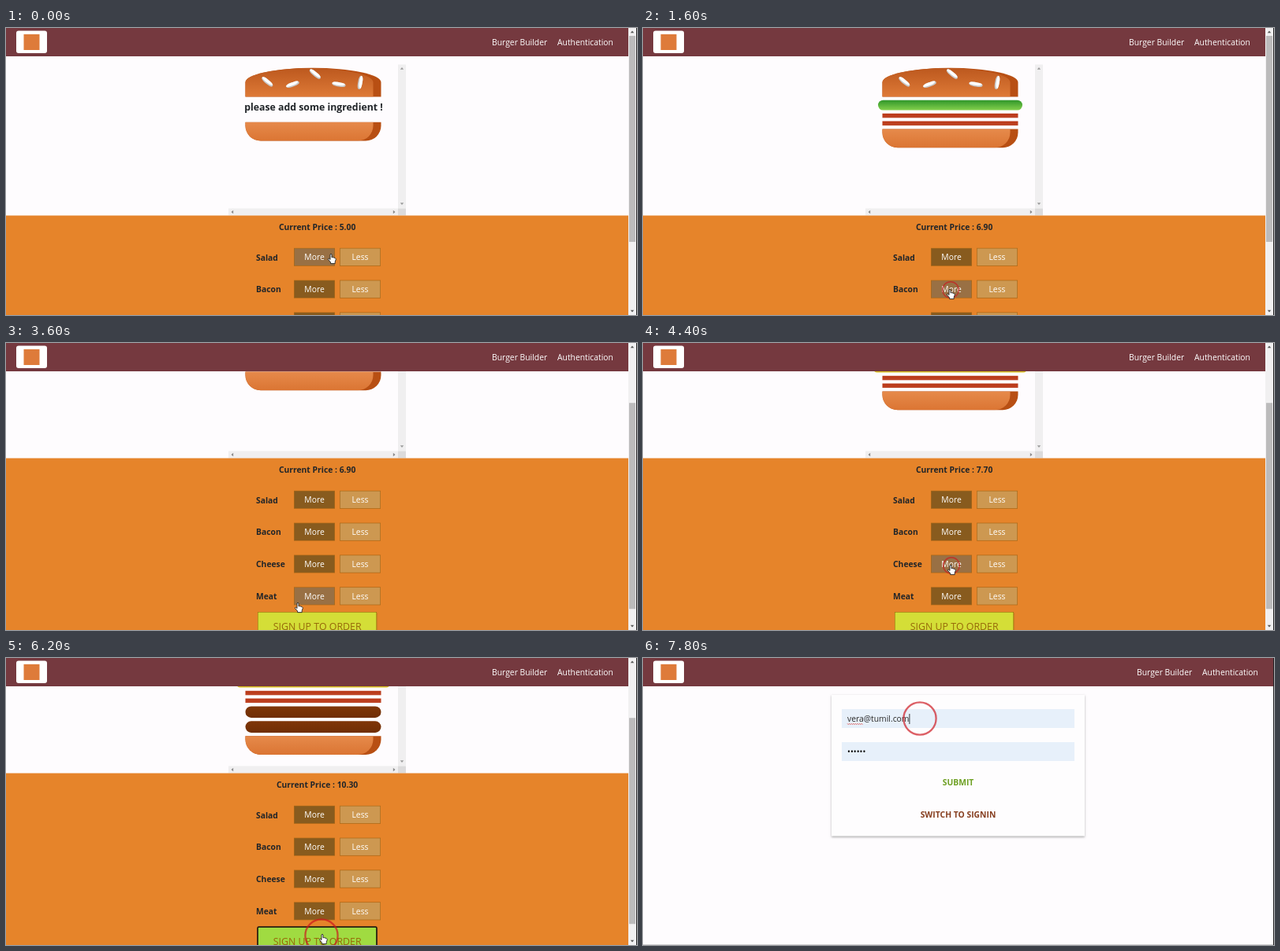
An HTML page with a canvas that plays this animation: 800x365 px, repeating every 8 s.

```html
<!DOCTYPE html>
<html lang="en">
<head>
<meta charset="utf-8">
<title>Burger Builder</title>
<style>
  html, body { margin: 0; width: 100%; height: 100%; overflow: hidden; background: #fefcfe; }
  canvas { display: block; width: 800px; height: 365px; }
</style>
</head>
<body>
<canvas id="stage"></canvas>
<script>
const W = 800, H = 365, LOOP = 8000, STEP = 200;
const canvas = document.getElementById('stage');
const ctx = canvas.getContext('2d');
const dpr = window.devicePixelRatio || 1;
canvas.width = W * dpr;
canvas.height = H * dpr;

const FONT = '"Open Sans", sans-serif';
const EMAIL = 'vera@tumil.com';
const PRICES = { salad: 0.5, cheese: 0.4, bacon: 0.7, meat: 1.3 };
const ROWS = ['Salad', 'Bacon', 'Cheese', 'Meat'];
const AUTH_AT = 6400;
const HIDE_POINTER_AT = 7400;

// time, x, y, added ingredient
const CLICKS = [
  [300, 401, 290, 'salad'],
  [1100, 390, 333, 'bacon'],
  [1500, 390, 333, 'bacon'],
  [2200, 798, 222],
  [3900, 391, 283, 'cheese'],
  [4300, 391, 283, 'cheese'],
  [5300, 391, 321, 'meat'],
  [5600, 391, 321, 'meat'],
  [6000, 400, 353],
  [7600, 351, 77]
];

// time, x, y of the pointer tip
const PATH = [
  [0, 412, 287], [200, 401, 288], [600, 399, 289], [1000, 389, 332],
  [1600, 389, 332], [1800, 570, 292], [2000, 795, 222], [2200, 795, 222],
  [2400, 795, 282], [2600, 795, 289], [2800, 795, 289], [3200, 580, 318],
  [3600, 370, 330], [3800, 390, 282], [4800, 390, 282], [5200, 390, 319],
  [5600, 390, 319], [6000, 401, 351], [6200, 401, 351], [6800, 440, 210],
  [7200, 454, 139], [8000, 454, 139]
];

function pointerAt(t) {
  const i = Math.max(1, PATH.findIndex(p => p[0] >= t));
  const [t0, x0, y0] = PATH[i - 1], [t1, x1, y1] = PATH[i];
  const k = (t - t0) / (t1 - t0);
  return { x: x0 + (x1 - x0) * k, y: y0 + (y1 - y0) * k };
}

const scrollAt = t => t < 2400 ? 0 : t < 2600 ? 82 : 92;

function countsAt(t) {
  const n = { salad: 0, cheese: 0, bacon: 0, meat: 0 };
  for (const [at, , , kind] of CLICKS) if (kind && at <= t) n[kind]++;
  return n;
}

function rect(x, y, w, h, color) {
  ctx.fillStyle = color;
  ctx.fillRect(x, y, w, h);
}

function text(str, x, y, size, color, weight = 400, align = 'left') {
  ctx.font = `${weight} ${size}px ${FONT}`;
  ctx.textAlign = align;
  ctx.fillStyle = color;
  ctx.fillText(str, x, y);
}

function vertical(y, h, from, to) {
  const g = ctx.createLinearGradient(0, y, 0, y + h);
  g.addColorStop(0, from);
  g.addColorStop(1, to);
  return g;
}

function rounded(x, y, w, h, radii) {
  const p = new Path2D();
  p.roundRect(x, y, w, h, radii);
  return p;
}

// Shape with a hard inner shade left by a shifted copy of itself
function shaded(path, light, dark, dx, dy) {
  ctx.save();
  ctx.fillStyle = dark;
  ctx.fill(path);
  ctx.clip(path);
  ctx.translate(dx, dy);
  ctx.fillStyle = light;
  ctx.fill(path);
  ctx.restore();
}

function seed(x, y, deg) {
  ctx.save();
  ctx.translate(x, y);
  ctx.rotate(deg * Math.PI / 180);
  shaded(rounded(-8.6, -2.75, 17.2, 5.5, [{ x: 6.9, y: 2.2 }]), '#fff', '#c9c9c9', -1.2, -1.6);
  ctx.restore();
}

const LAYERS = {
  salad: { w: 183, h: 12.8, r: 6.4, from: '#2f962a', to: '#84d04c' },
  cheese: { w: 193.5, h: 8.2, r: 4.1, from: '#f4d004', to: '#d6bb22' },
  bacon: { w: 172, h: 5.5, r: 0, from: '#b93514', to: '#c0482a' },
  meat: { w: 172, h: 14.6, r: 7.3, from: '#7f3608', to: '#702e05' }
};

function burger(top, counts) {
  const mid = 389.5, left = 303.5, gap = 4.3;
  let y = top + gap;
  const bun = rounded(left, y, 172, 36.6, [{ x: 86, y: 18.3 }, { x: 86, y: 18.3 }, 0, 0]);
  shaded(bun, vertical(y, 36.6, '#bc581e', '#de7a37'), '#b84f13', -10, 0);
  seed(363.5, y + 21, -20);
  seed(331.3, y + 17.6, 40);
  seed(391.9, y + 7.8, 40);
  seed(422, y + 21, 10);
  seed(449, y + 18.5, 100);
  y += 36.6 + gap;

  let empty = true;
  for (const kind in LAYERS) {
    const { w, h, r, from, to } = LAYERS[kind];
    for (let i = 0; i < counts[kind]; i++) {
      ctx.fillStyle = vertical(y, h, from, to);
      ctx.fill(rounded(mid - w / 2, y, w, h, r));
      y += h + gap;
      empty = false;
    }
  }
  if (empty) {
    text('please add some ingredient !', 390, top + 58.8, 12.3, '#212529', 700, 'center');
    y = top + 73.3;
  }
  const base = rounded(left, y, 172, 23.8, [0, 0, 19.4, 19.4]);
  shaded(base, vertical(y, 23.8, '#e68a4b', '#db7533'), '#b84f13', -10, 0);
}

function arrowhead(x, y, dx, dy, color) {
  ctx.fillStyle = color;
  ctx.beginPath();
  ctx.moveTo(x + dx * 1.5, y + dy * 1.5);
  ctx.lineTo(x - dx * 1.2 + dy * 2.2, y - dy * 1.2 + dx * 2.2);
  ctx.lineTo(x - dx * 1.2 - dy * 2.2, y - dy * 1.2 - dx * 2.2);
  ctx.fill();
}

function viewerBars(y) {
  rect(497, y, 10, 183, '#f0eff0');
  rect(282, y + 183, 215, 9, '#f0eff0');
  rect(497, y + 183, 10, 9, '#dcdbdc');
  arrowhead(502, y + 5, 0, -1, '#9b9b9b');
  arrowhead(502, y + 177, 0, 1, '#9b9b9b');
  arrowhead(287, y + 187.5, -1, 0, '#888');
  arrowhead(492, y + 187.5, 1, 0, '#888');
}

const inside = (p, x, y, w, h) => p.x >= x && p.x <= x + w && p.y >= y && p.y <= y + h;

function button(label, x, y, color) {
  rect(x, y, 52, 23, '#aa6817');
  rect(x + 0.7, y + 0.7, 50.6, 21.6, color);
  text(label, x + 26, y + 15.5, 10.35, '#fff', 400, 'center');
}

function orderButton(y, hover, focus) {
  ctx.save();
  ctx.shadowColor = '#966909';
  ctx.shadowOffsetX = ctx.shadowOffsetY = 1.3 * dpr;
  ctx.shadowBlur = 1.5 * dpr;
  rect(319, y, 151, 37, '#966909');
  ctx.restore();
  rect(319.6, y + 0.6, 149.8, 36, hover ? '#a0db41' : '#d4de37');
  if (focus) {
    ctx.strokeStyle = '#101010';
    ctx.lineWidth = 1.5;
    ctx.stroke(rounded(319, y, 151, 37, 1.5));
  }
  text('SIGN UP TO ORDER', 394.7, y + 23.4, 12.4, '#966909', 400, 'center');
}

function builder(t, mouse) {
  const s = scrollAt(t), counts = countsAt(t);
  let hand = false;
  const over = (x, y, w, h) => {
    const hit = inside(mouse, x, y, w, h);
    hand = hand || hit;
    return hit;
  };
  burger(46.5 - s, counts);
  viewerBars(46.5 - s);

  rect(0, 238.5 - s, 789, 300, '#e6842a');
  let price = 5;
  for (const kind in counts) price += counts[kind] * PRICES[kind];
  text('Current Price : ' + price.toFixed(2), 394.6, 257 - s, 10.35, '#212529', 700, 'center');

  ROWS.forEach((name, i) => {
    const y = 279.8 + i * 40.85 - s;
    text(name, 317, y + 15.8, 10.35, '#212529', 700);
    button('More', 365, y, over(365, y, 52, 23) ? '#997044' : '#885b1e');
    button('Less', 423, y, '#cd9851');
  });
  const orderY = 434 - s;
  orderButton(orderY, over(319, orderY, 151, 37), t > 6000);
  return hand;
}

function wave(x, y, w) {
  ctx.strokeStyle = '#e0504c';
  ctx.lineWidth = 0.8;
  ctx.beginPath();
  for (let i = 0; i <= w; i += 1.3) ctx.lineTo(x + i, y + (Math.round(i / 1.3) % 2 ? 0.7 : -0.7));
  ctx.stroke();
}

function auth(t) {
  ctx.save();
  ctx.shadowColor = 'rgba(0,0,0,.3)';
  ctx.shadowOffsetY = 1 * dpr;
  ctx.shadowBlur = 2.5 * dpr;
  rect(239, 47, 321, 179.5, '#fefdfe');
  ctx.restore();
  rect(252, 65, 295, 24, '#e7f0fa');
  rect(252, 107, 295, 24, '#e7f0fa');
  text(EMAIL, 259, 80.8, 10.35, '#2a2a2a');
  if (t > 7600) {
    const end = 259 + ctx.measureText(EMAIL).width;
    wave(259, 84, ctx.measureText(EMAIL.split('@')[0]).width);
    rect(end, 71, 0.9, 13, '#222');
  }
  text('••••••', 259, 122.8, 10.35, '#111');
  text('SUBMIT', 399.5, 162.2, 10.35, '#6ea023', 700, 'center');
  text('SWITCH TO SIGNIN', 399.5, 203, 10.35, '#873f20', 700, 'center');
  rect(0, 364, 799, 1, '#d2d0d2');
}

function header(width) {
  rect(0, 0, width, 36, '#75393f');
  ctx.fillStyle = '#fff';
  ctx.fill(rounded(13, 3.5, 39, 28.5, 3));
  rect(22.5, 8, 20, 20, '#de7b3a');
  text('Burger Builder', width - 173, 22, 10.35, '#fff');
  text('Authentication', width - 90, 22, 10.35, '#fff');
}

function pageBar(t) {
  const dragging = t >= 2200 && t <= 2600;
  rect(789, 0, 10, H, '#f1f0f1');
  rect(790, 10 + scrollAt(t) * 0.72, 8, 262, dragging ? '#787878' : '#bcbbbc');
  arrowhead(794, 5, 0, -1, '#555');
  arrowhead(794, 360, 0, 1, '#555');
}

function ring(t) {
  for (const [at, x, y] of CLICKS) {
    const age = t - at;
    if (age <= 0 || age > STEP) continue;
    ctx.strokeStyle = 'rgba(205,22,30,.68)';
    ctx.lineWidth = age < STEP ? 1.4 : 2.3;
    ctx.beginPath();
    ctx.arc(x, y, age * 0.103, 0, Math.PI * 2);
    ctx.stroke();
  }
}

const ARROW = new Path2D('M0 0V9.6L2.2 7.6L3.7 11L5.2 10.3L3.8 7.1H6.8Z');
const HAND = new Path2D('M-1 1Q0-.8 1 1V4.8L2.4 4.6L4 5.1L5.6 5.8Q6.4 6.2 6.2 7.6L5.2 10.4V12.6H-.4V11L-3.4 7.6Q-4 6.2-2.6 6.2L-1 7.5Z');

function pointer(p, hand) {
  const shape = hand ? HAND : ARROW;
  ctx.save();
  ctx.translate(p.x, p.y);
  ctx.lineJoin = 'round';
  ctx.lineWidth = 0.9;
  ctx.strokeStyle = '#222';
  ctx.fillStyle = '#fff';
  ctx.fill(shape);
  ctx.stroke(shape);
  ctx.restore();
}

function draw(t) {
  const mouse = pointerAt(t);
  const onAuth = t >= AUTH_AT;
  let hand = false;
  ctx.setTransform(dpr, 0, 0, dpr, 0, 0);
  rect(0, 0, W, H, '#fefcfe');
  if (onAuth) auth(t);
  else hand = builder(t, mouse);
  header(onAuth ? 799 : 789);
  ring(t);
  if (!onAuth) pageBar(t);
  rect(799, 0, 1, H, '#252325');
  if (t < HIDE_POINTER_AT) pointer(mouse, hand);
}

const start = performance.now();
function tick() {
  const t = (performance.now() - start) % LOOP;
  draw(Math.floor(t / STEP) * STEP);
  requestAnimationFrame(tick);
}
tick();
</script>
</body>
</html>
```
